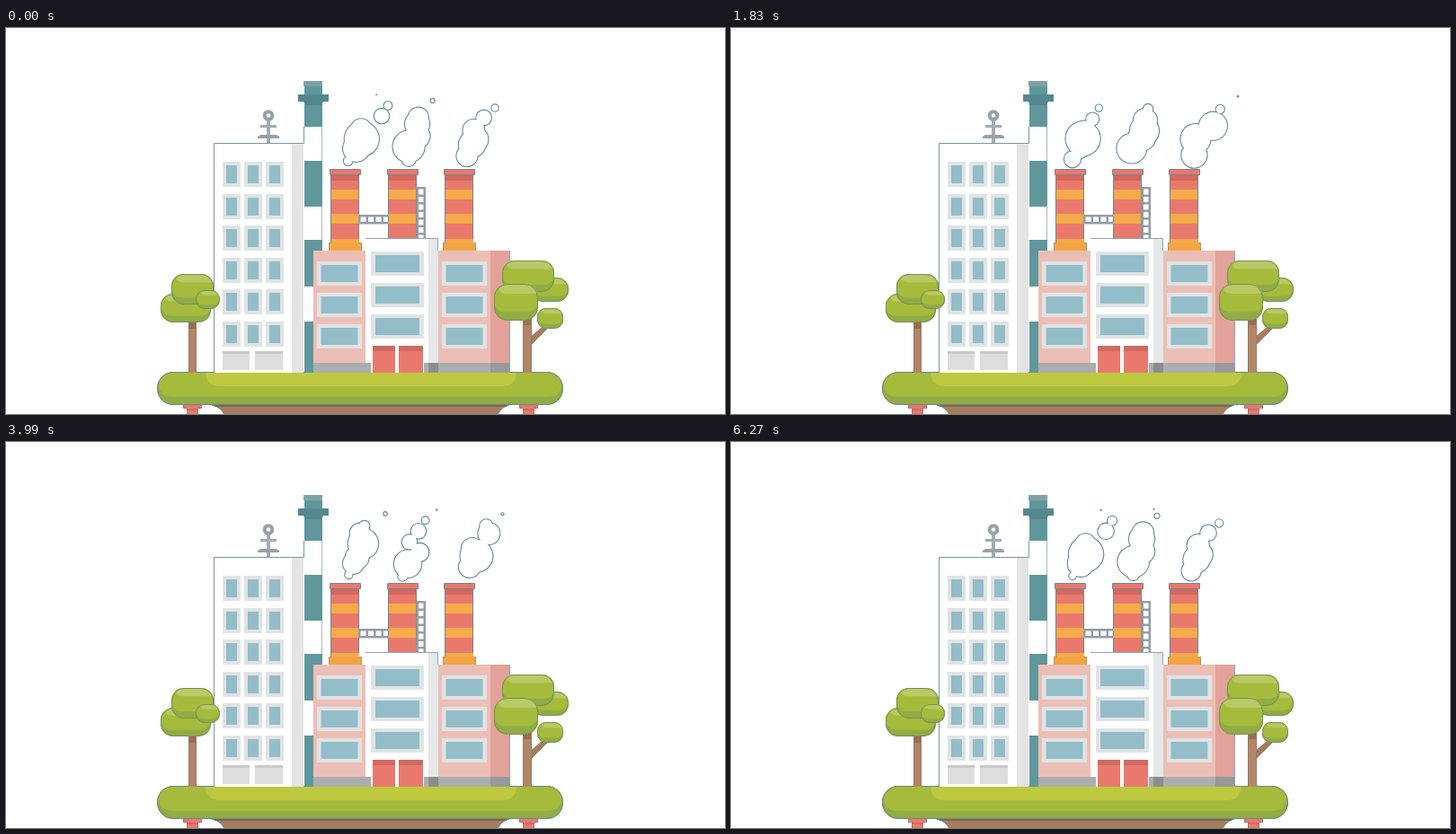
An HTML page that plays this animation: 800x430 px, repeating every 6300 ms.

```html
<!DOCTYPE html>
<html lang="en">
<head>
<meta charset="utf-8">
<title>Factory</title>
<style>
  html, body { margin: 0; width: 100%; height: 100%; overflow: hidden; background: #fff; }
  svg { display: block; }
</style>
</head>
<body>
<svg id="stage" width="800" height="430" viewBox="0 0 800 430"></svg>
<script>
const LOOP = 6300, STEP = 30;
const LINE = '#5f8a9b', EDGE = '#6c8790', TEAL = '#5f979c', GLASS = '#93bdc8', GRAY = '#a5abaf';
const RED = '#ea796d', DARK_RED = '#cf6a60', ORANGE = '#f6ab4a';
const LIME = '#a6bb3c', LEAF_DARK = '#8fac46', LEAF_LIGHT = '#b9c963';
const BARK = '#b18666', BARK_DARK = '#976f54';

const stage = document.getElementById('stage');
let clipCount = 0;

function add(parent, tag, attrs) {
  const node = document.createElementNS('http://www.w3.org/2000/svg', tag);
  for (const key in attrs) node.setAttribute(key, attrs[key]);
  parent.appendChild(node);
  return node;
}
// Boxes are given by their left, top, right and bottom edges.
function box(x1, y1, x2, y2, fill, rx = 0, parent = stage) {
  return add(parent, 'rect', { x: x1, y: y1, width: x2 - x1, height: y2 - y1, rx, fill });
}
function path(d, fill, stroke = 'none', width = 1) {
  return add(stage, 'path', { d, fill, stroke, 'stroke-width': width });
}
function outline(x1, y1, x2, y2, rx = 0) {
  const edge = box(x1 + .5, y1 + .5, x2 - .5, y2 - .5, 'none', rx);
  edge.setAttribute('stroke', EDGE);
}
function framed(x1, y1, x2, y2, inset) {
  box(x1, y1, x2, y2, '#e1e3e4');
  box(x1 + inset, y1 + 4, x2 - inset, y2 - 4, GLASS);
}

function ground() {
  path('M229 420H560Q551 422 547 431H243Q239 422 229 420Z', '#a57d5e', EDGE);
  path('M232 421H557', 'none', '#876548', 2);
  for (const x of [197, 571]) {
    box(x, 420, x + 21, 424, RED);
    box(x + 4, 424, x + 17, 430, RED);
    box(x + 4, 424, x + 17, 426, DARK_RED);
    path(`M${x + .5} 420V423.5H${x + 4.5}V430M${x + 20.5} 420V423.5H${x + 16.5}V430`, 'none', '#b3746e');
  }
  box(168, 383, 620, 420, LEAF_DARK, 18);
  path('M186 384H602Q618 385 618 399Q616 411 602 411H186Q172 411 170 399Q170 385 186 384Z', LIME);
  path('M222 384H568Q567 399 552 399H238Q223 399 222 384Z', '#bec93f');
  outline(168, 383, 620, 420, 18);
}

function tealChimney() {
  box(332, 59, 352, 384, '#fff');
  path('M351.5 110V248', 'none', '#a3b9c1');
  for (const [top, bottom] of [[82, 110], [148, 199], [236, 288], [327, 384]]) box(332, top, 352, bottom, TEAL);
  box(331, 59, 352, 65, '#80a1a6');
  box(332, 65, 352, 74, TEAL);
  path('M325 74H359V82H353L351 86H333L331 82H325Z', '#54888e');
}

function antenna() {
  add(stage, 'circle', { cx: 292, cy: 97.5, r: 4.3, fill: 'none', stroke: '#98a1a6', 'stroke-width': 4 });
  box(290, 103, 294, 128, GRAY);
  box(283, 108, 301, 111, GRAY);
  path('M280 123V121L283 119H301L304 121V123Z', '#98a1a6');
}

function officeTower() {
  box(232, 128, 331, 384, '#fff');
  box(318, 129, 331, 384, '#e4e4e4');
  path('M231.5 384V128.5H331.5V110', 'none', '#7597a9');
  for (let row = 0; row < 6; row++)
    for (let col = 0; col < 3; col++) {
      const x = 241 + col * 24, y = Math.round(149 + row * 35.6);
      framed(x, y, x + 20, y + 28, 4);
    }
  for (const [x1, x2] of [[241, 271], [277, 308]]) {
    box(x1, 360, x2, 381, '#dddddd');
    box(x1, 360, x2, 363, '#c9c9c9');
  }
}

function redChimney(x, bottom, hasBase) {
  box(x, 163, x + 30, bottom, RED);
  box(x, 164, x + 30, 170, '#d3685e');
  for (const y of [180, 207]) box(x, y, x + 30, y + 11, ORANGE);
  path(`M${x - .5} 164V${bottom}M${x + 30.5} 164V${bottom}`, 'none', EDGE);
  box(x - 2, 157, x + 33, 164, RED, 1);
  outline(x - 2, 157, x + 33, 164, 1);
  box(x - 1, 158, x + 32, 163, RED);
  if (!hasBase) return;
  box(x, 235, x + 31, 240, ORANGE);
  box(x - 3, 239, x + 34, 248, '#f2a643');
  path(`M${x - 2.5} 248V239.5H${x}M${x + 31} 239.5H${x + 33.5}V248`, 'none', '#b09668');
}

function ladder(x, y, length, angle) {
  const g = add(stage, 'g', { transform: `translate(${x} ${y}) rotate(${angle})` });
  for (const side of [0, 8]) box(0, side, length, side + 2.5, '#939ea4', 0, g);
  for (let step = 0; step < length; step += 8.5) box(step, 0, step + 2.5, 10, '#939ea4', 0, g);
}

function plant() {
  box(342, 248, 400, 384, '#ecbfb6');
  box(481, 248, 539, 384, '#ecbfb6');
  box(539, 248, 561, 384, '#e2a299');
  box(400, 234, 470, 384, '#fff');
  box(470, 234, 481, 384, '#e5e7e8');
  box(342, 373, 539, 384, '#abaeaf');
  box(470, 373, 481, 384, '#8b8d8e');
  box(539, 373, 561, 384, '#97999a');
  path('M400 234.5H480.5V248M560.5 248V384', 'none', '#8aa8b5');
  for (let row = 0; row < 3; row++) {
    const y = 260 + row * 35;
    framed(346, y, 396, y + 27, 4.5);
    framed(406, y - 11, 465, y + 16, 5);
    framed(485, y, 535, y + 27, 4.5);
  }
  box(406, 354, 465, 384, '#fff');
  for (const [x1, x2] of [[408, 433], [437, 464]]) {
    box(x1, 354, x2, 384, RED);
    box(x1, 354, x2, 360, DARK_RED);
  }
}

function leaves(x1, y1, x2, y2, r) {
  const id = 'leaf' + clipCount++;
  box(x1, y1, x2, y2, '#000', r, add(stage, 'clipPath', { id }));
  const g = add(stage, 'g', { 'clip-path': `url(#${id})` });
  const h = y2 - y1;
  box(x1, y1, x2, y2, LEAF_DARK, 0, g);
  box(x1, y1 - h, x2, y2 - h * .23, LIME, r * .8, g);
  box(x1 + 4, y1 - h, x2 + 4, y1 + h * .27, LEAF_LIGHT, r * .6, g);
  const edge = box(x1 + .5, y1 + .5, x2 - .5, y2 - .5, 'none', r - .5);
  edge.setAttribute('stroke', '#768f58');
}

function trunk(x1, x2, top) {
  box(x1, top, x2, 384, BARK);
  box(x1, top, x2, top + 9, BARK_DARK);
  path(`M${x1 + .5} ${top}V384M${x2 - .5} ${top}V384`, 'none', '#94796a');
}

function trees() {
  trunk(203, 212, 326);
  leaves(172, 296, 228, 328, 14);
  leaves(184, 274, 231, 308, 14);
  leaves(211, 292, 238, 313, 10);
  path('M584 344L597 333H604L584 353Z', '#a67c5e', '#94796a');
  trunk(575, 585, 322);
  leaves(585, 278, 626, 305, 13);
  leaves(552, 259, 610, 294, 14);
  leaves(543, 285, 592, 326, 15);
  leaves(591, 312, 620, 335, 10);
}

// Smoke: each chimney sends up seeded puffs that swell, drift right and shrink away.
const PUFFS = 23, LIFE = 1850, TOP = 153, RISE = 82;

function seeded(seed) {
  return () => {
    seed = (seed + 0x6D2B79F5) | 0;
    let t = Math.imul(seed ^ (seed >>> 15), 1 | seed);
    t = (t + Math.imul(t ^ (t >>> 7), 61 | t)) ^ t;
    return ((t ^ (t >>> 14)) >>> 0) / 4294967296;
  };
}
const swell = u => u ** .8 * (1 - u) ** 1.6;
const PEAK = swell(1 / 3);

function makePuffs() {
  const outlines = add(stage, 'g', { fill: LINE });
  const bodies = add(stage, 'g', { fill: '#fff' });
  const random = seeded(7);
  const spread = range => (random() - .5) * range;
  const puffs = [];
  for (const [x, drift] of [[378, 42], [441, 32], [505, 50]])
    for (let i = 0; i < PUFFS; i++)
      puffs.push({
        birth: (i + random() * .8) * LOOP / PUFFS,
        x: x + spread(8), drift: drift + spread(26), size: 10 + random() * 10,
        outline: add(outlines, 'circle', {}), body: add(bodies, 'circle', {})
      });
  return puffs;
}

ground();
tealChimney();
antenna();
officeTower();
redChimney(362, 240, true);
redChimney(426, 234, false);
redChimney(489, 240, true);
ladder(392, 208, 34, 0);
ladder(467, 177, 57, 90);
plant();
trees();
const puffs = makePuffs();

function place(circle, x, y, r) {
  circle.setAttribute('cx', x.toFixed(2));
  circle.setAttribute('cy', y.toFixed(2));
  circle.setAttribute('r', r.toFixed(2));
}

function draw(time) {
  for (const p of puffs) {
    const age = ((time - p.birth + LOOP) % LOOP) / LIFE;
    const r = age < 1 ? p.size * swell(age) / PEAK : 0;
    const x = p.x + p.drift * age, y = TOP - RISE * age;
    place(p.outline, x, y, r > .4 ? r + .5 : 0);
    place(p.body, x, y, Math.max(0, r - .6));
  }
}

const start = performance.now();
function tick() {
  const time = (performance.now() - start) % LOOP;
  draw(Math.floor(time / STEP) * STEP);
  requestAnimationFrame(tick);
}
tick();
</script>
</body>
</html>
```
